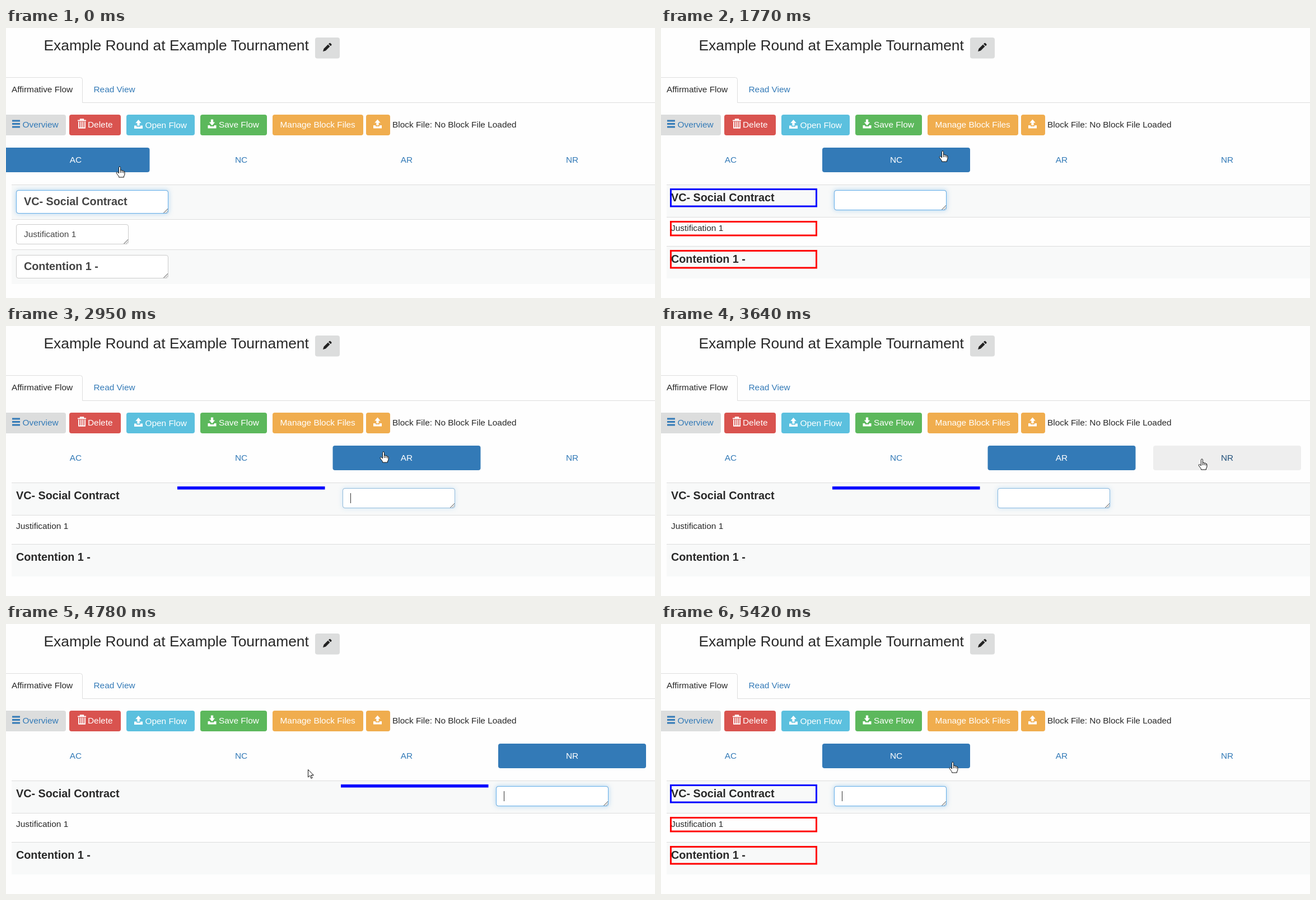
Animation, 1159 px wide and 483 px high, one loop 6340 ms. Source, as an HTML page:

```html
<!DOCTYPE html>
<html lang="en">
<head>
<meta charset="utf-8">
<title>Debate flow</title>
<style>
html, body { margin: 0; width: 100%; height: 100%; overflow: hidden; background: #fefefe; }
body { position: relative; }
svg { position: absolute; left: 0; top: 0; display: block; }
text { font: 15.4px "Liberation Sans", Arial, sans-serif; fill: #282828; white-space: pre; }
.title { font-size: 26.4px; }
.head { font-size: 19.8px; font-weight: bold; }
.typed text { fill: #444; }
.link { fill: #337ab7; }
.light, .light text { fill: #fff; }
.line { stroke: #ddd; fill: none; }
.stripe { fill: #f8f9f9; }
.box { fill: none; stroke: #f00; stroke-width: 3; }
.pill rect { fill: none; }
.pill text { fill: #337ab7; text-anchor: middle; }
.pill.hover rect { fill: #eee; }
.pill.hover text { fill: #23527c; }
.pill.on rect { fill: #337ab7; }
.pill.on text { fill: #fff; }
.field {
  position: absolute; box-sizing: border-box; width: 201px; height: 36px;
  border: 1px solid #ccc; border-radius: 4px; background: #fff;
}
.field.big { width: 272px; height: 42px; }
.field::before {
  content: ""; position: absolute; right: 0; bottom: 0; width: 8px; height: 8px;
  background: linear-gradient(135deg, transparent 50%, #999 50% 57%, transparent 57% 74%, #999 74% 81%, transparent 81%);
}
.field::after {
  content: ""; position: absolute; inset: -1px; border: 1px solid #66afe9; border-radius: 4px;
  box-shadow: 0 0 8px rgba(102, 175, 233, .5); opacity: var(--glow, 0);
}
body[data-tab="0"] .flow, body:not([data-tab="0"]) .case, body:not([data-tab="1"]) .marks { display: none; }
</style>
</head>
<body data-tab="0">
<svg width="1159" height="483">
  <defs>
    <path id="tray" d="M0 10.5h4v2h7v-2h4V16H0z"/>
    <g id="up"><path d="M7.5 0l5.2 6H9.6v4.8H5.4V6H2.3z"/><use href="#tray"/></g>
    <g id="down"><path d="M5.4 0h4.2v5h3.1l-5.2 6-5.2-6h3.1z"/><use href="#tray"/></g>
    <g id="trash" fill="none" stroke="#fff">
      <path d="M0 3h15M4.8 3V.8h5.4V3" stroke-width="2"/>
      <path d="M2 5v11.2h11V5M5.7 5v11M9.3 5v11" stroke-width="1.9"/>
    </g>
  </defs>

  <text class="title" x="67.5" y="40">Example Round at Example Tournament</text>
  <rect x="552" y="17" width="44" height="37.5" rx="4" fill="#dcdddd"/>
  <path fill="#222" d="M566 42l1.5-5 7.5-7.5 3.5 3.5-7.5 7.5zM576 28.5l1.5-1.5q1-.6 1.8 0l2 2q.6.9 0 1.7l-1.6 1.5z"/>

  <path class="line" d="M0 88.5H132.5q4 0 4 4V133.5H1159"/>
  <text x="10" y="115">Affirmative Flow</text>
  <text class="link" x="156.5" y="115">Read View</text>

  <rect x="-6" y="155" width="113" height="37" rx="4" fill="#dcdddd"/>
  <path d="M11 166h14M11 171.5h14M11 177h14" stroke="#337ab7" stroke-width="2.8"/>
  <text class="link" x="29.5" y="178">Overview</text>
  <g class="light">
    <g id="buttons"></g>
    <use href="#trash" x="128" y="162.5"/>
    <use href="#up" x="229" y="164"/>
    <use href="#down" x="360.5" y="163.5"/>
    <use href="#up" x="656" y="163.5"/>
    <text x="146" y="178">Delete</text>
    <text x="248.5" y="179">Open Flow</text>
    <text x="380" y="178">Save Flow</text>
    <text x="489.5" y="178">Manage Block Files</text>
  </g>
  <text x="690" y="178">Block File: No Block File Loaded</text>

  <g id="pills"></g>

  <g class="case">
    <path class="stripe" d="M10 280H1159V342H10zM10 397H1159V458H10z"/>
    <path class="line" d="M10 280.5H1159M10 342.5H1159M10 396.5H1159"/>
  </g>
  <g class="flow">
    <path class="stripe" d="M10 280H1159V338H10zM10 390H1159V448H10z"/>
    <path class="line" d="M10 280.5H1159M10 338.5H1159M10 390.5H1159"/>
  </g>
</svg>

<div class="case">
  <div class="field big" style="left:18px;top:290px;--glow:1"></div>
  <div class="field" style="left:18px;top:351px"></div>
  <div class="field big" style="left:18px;top:406px"></div>
</div>
<div class="flow"><div class="field" id="entry" style="top:290px"></div></div>

<svg width="1159" height="483">
  <g class="case typed">
    <text class="head" x="32" y="317">VC- Social Contract</text>
    <text x="32" y="374">Justification 1</text>
    <text class="head" x="32" y="433">Contention 1 -</text>
  </g>
  <g class="flow">
    <text class="head" x="18" y="310">VC- Social Contract</text>
    <text x="18" y="363">Justification 1</text>
    <text class="head" x="18" y="420">Contention 1 -</text>
    <g class="marks">
      <rect class="box" x="17.5" y="288.5" width="260" height="30.5" style="stroke:#00f"/>
      <rect class="box" x="17.5" y="346.5" width="260" height="24.5"/>
      <rect class="box" x="17.5" y="398.5" width="260" height="30.5"/>
    </g>
    <rect id="bar" y="287" width="263.5" height="5.5" fill="#00f"/>
    <rect id="caret" y="299" width="1" height="18" fill="#333"/>
  </g>
  <g id="cursor" fill="#fff" stroke="#111" stroke-linejoin="round">
    <g id="hand">
      <path d="M-1.5 12V1.6Q-1.5 0 0 0T1.5 1.6V7Q2 6 3 6.2T4.2 7.6Q5 6.6 6 7T7 8.6Q8.9 7.8 9 9.8V13Q9 15 7.5 17V19H-1.5V17.5Q-4 14-5.6 11.8Q-6.4 10-4.8 9.6Q-3.5 9.4-1.5 12Z"/>
      <path fill="none" d="M1.5 7v4M4.2 7.6v3.4M7 8.6v3"/>
    </g>
    <path id="arrow" d="M.5.5V14l3.2-3 2.2 5.2 2.2-1-2.2-4.7h4.4z"/>
  </g>
</svg>

<script>
const LOOP = 6340;
const $ = id => document.getElementById(id);
const svg = (tag, attrs, parent) => {
  const el = document.createElementNS("http://www.w3.org/2000/svg", tag);
  for (const key in attrs) el.setAttribute(key, attrs[key]);
  return parent.appendChild(el);
};

const buttons = [
  [113, 92, "#d9534f"], [215, 122, "#5bc0de"], [347, 119, "#5cb85c"],
  [476, 162, "#f0ad4e"], [643, 43, "#f0ad4e"]
];
for (const [x, width, fill] of buttons)
  svg("rect", { x, y: 155, width, height: 37, rx: 4, fill }, $("buttons"));

const pillX = i => -7.5 + 295.5 * i;
const pills = ["AC", "NC", "AR", "NR"].map((name, i) => {
  const g = svg("g", { class: "pill" }, $("pills"));
  svg("rect", { x: pillX(i), y: 214, width: 264, height: 44, rx: 4 }, g);
  svg("text", { x: pillX(i) + 132, y: 241 }, g).textContent = name;
  return g;
});

// Screen refreshes: [first, last, count]
const refreshes = [
  [0, 0, 1], [530, 1060, 8], [1160, 1320, 3], [1610, 1770, 3], [1840, 2100, 4], [2400, 2480, 2],
  [2720, 2720, 1], [2790, 3310, 7], [3390, 3390, 1], [3640, 3640, 1], [3710, 3870, 3],
  [4370, 4780, 7], [4860, 4940, 2], [5170, 5420, 4]
];
const ticks = refreshes.flatMap(([a, b, n]) =>
  Array.from({ length: n }, (_, i) => n > 1 ? a + (b - a) * i / (n - 1) : a));

// Pointer hot spot: [time, x, y]
const path = [
  [0, 203, 248], [460, 203, 248], [1060, 332, 238], [1540, 332, 238], [1770, 503, 220], [2100, 671, 225],
  [2330, 671, 225], [2480, 674, 225], [2900, 674, 225], [3310, 966, 238], [4300, 966, 238],
  [4570, 760, 263], [4780, 539, 260], [4940, 521, 247], [LOOP, 521, 247]
];

// Clicks: [time, pill], blurs just before the next click
const clicks = [[0, 0], [1160, 1], [2790, 2], [3710, 3], [5250, 1]];
const blurs = [1160, 2670, 3590, 5120, Infinity];
const carets = [[1160, 1610], [2100, 2670], [2790, 3310], [3710, 5120], [5250, LOOP]];
const entryX = [0, 309, 601, 875];
const barX = [0, 0, 306, 598];

const clamp = v => Math.max(0, Math.min(1, v));

function slope(k, axis) {
  const a = path[k - 1], p = path[k], b = path[k + 1];
  const resting = q => !q || q[1] === p[1];
  return resting(a) || resting(b) ? 0 : (b[axis] - a[axis]) / (b[0] - a[0]);
}

function pointer(t) {
  const k = path.findIndex((p, i) => i && t <= p[0]) - 1;
  const a = path[k], b = path[k + 1], d = b[0] - a[0], u = (t - a[0]) / d;
  const ease = u * u * (3 - 2 * u);
  return [1, 2].map(i => a[i] + (b[i] - a[i]) * ease
    + d * u * (1 - u) * ((1 - u) * slope(k, i) - u * slope(k + 1, i)));
}

function render(now) {
  const time = now % LOOP;
  const t = ticks.findLast(tick => tick <= time + .01);
  const step = clicks.findLastIndex(c => c[0] <= t);
  const [since, tab] = clicks[step];
  document.body.dataset.tab = tab;

  const [x, y] = pointer(t).map(Math.round);
  const over = y >= 214 && y < 258 ? pills.findIndex((_, i) => x >= pillX(i) && x < pillX(i) + 264) : -1;
  const hover = over === 2 && t < 2400 ? -1 : over;
  pills.forEach((p, i) => {
    p.classList.toggle("on", i === tab);
    p.classList.toggle("hover", i === hover);
  });

  $("cursor").setAttribute("transform", `translate(${x} ${y})`);
  $("hand").style.display = over < 0 ? "none" : "";
  $("arrow").style.display = over < 0 ? "" : "none";

  const glow = Math.min(clamp((t - since) / 150), 1 - clamp((t - blurs[step]) / 150));
  $("entry").style.left = entryX[tab] + "px";
  $("entry").style.setProperty("--glow", glow);
  $("caret").setAttribute("x", entryX[tab] + 14);
  $("caret").style.display = carets.some(([a, b]) => t >= a && t < b) ? "" : "none";
  $("bar").setAttribute("x", barX[tab]);
  $("bar").style.display = tab > 1 ? "" : "none";
}

const start = performance.now();
function loop() {
  render(performance.now() - start);
  requestAnimationFrame(loop);
}
loop();
</script>
</body>
</html>
```
